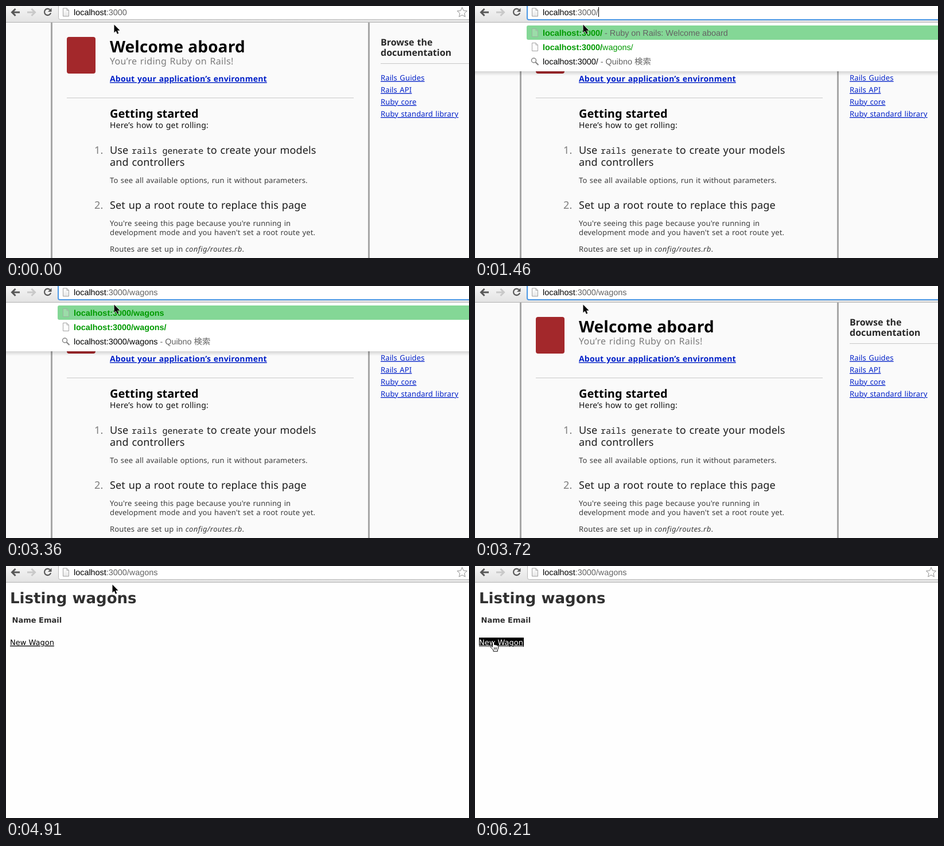
An HTML page that plays this animation: 807 by 440 pixels, repeating every 8000 ms.

```html
<!DOCTYPE html>
<html lang="en">
<head>
<meta charset="utf-8">
<title>Opening the wagons page</title>
<style>
html, body { margin: 0; width: 100%; height: 100%; overflow: hidden; }
svg { display: block; }
text { white-space: pre; text-rendering: geometricPrecision; }
.page { font-family: "Noto Sans", "Open Sans", sans-serif; word-spacing: .056em; }
.body { font-size: 13px; fill: #3c3c3c; letter-spacing: .01em; }
.head { font-size: 18px; fill: #1c1c1c; letter-spacing: .008em; }
.mid { font-size: 14px; fill: #111; letter-spacing: .013em; }
.num { fill: #7c7c7c; }
.bold { font-weight: bold; }
.link { fill: #0020c8; text-decoration: underline; text-decoration-skip-ink: none; }
.code { font: 14.9px "Noto Sans Mono", monospace; word-spacing: 0; letter-spacing: 0; }
.path { font-style: italic; letter-spacing: .03em; }
.list { font: 13px "DejaVu Sans", sans-serif; }
.ui { font: 14.4px "Liberation Sans", "Noto Sans CJK JP", "Noto Sans CJK", sans-serif; }
.black { fill: #000; }
.grey { fill: #636363; }
.green { fill: #009a00; }
.match { fill: #009a00; font-weight: bold; }
</style>
</head>
<body>
<svg width="807" height="440" viewBox="0 0 807 440">
  <defs>
    <linearGradient id="bar" x2="0" y2="1"><stop stop-color="#f5f5f5"/><stop offset="1" stop-color="#e3e3e3"/></linearGradient>
    <linearGradient id="shade" x2="0" y2="1"><stop stop-color="#000" stop-opacity=".15"/><stop offset="1" stop-color="#000" stop-opacity="0"/></linearGradient>
    <linearGradient id="sheet" x2="0" y2="1"><stop stop-color="#fff"/><stop offset="1" stop-color="#e6e6e6"/></linearGradient>
    <g id="doc" stroke="#a4a4a4"><path d="M.5.5h6.5l3.5 3.5v10.5h-10z" stroke-linejoin="round"/><path d="M7 .5v3.5h3.5" fill="none"/></g>
  </defs>

  <g id="welcome" class="page">
    <path fill="#fafafa" d="M0 0h807v440H0z"/>
    <path fill="#a6a6a6" d="M78 28h3v412h-3zM631 28h3v412h-3z"/>
    <path fill="#c8c8c8" d="M106 160h500v1H106zM653 100h154v1H653z"/>
    <rect x="106" y="54" width="50" height="64" rx="4" fill="#a3282b"/>
    <text x="181" y="81" class="bold" font-size="28" letter-spacing=".1">Welcome aboard</text>
    <text x="181" y="102" font-size="16" fill="#7c7c7c" letter-spacing=".33">You’re riding Ruby on Rails!</text>
    <text x="181" y="132" class="mid bold link">About your application’s environment</text>
    <text x="181" y="195" class="bold" font-size="20">Getting started</text>
    <text x="181" y="213" class="mid">Here’s how to get rolling:</text>
    <text x="154" y="258" class="head num">1.</text>
    <text x="181" y="258" class="head">Use</text>
    <text x="219" y="258" class="code" fill="#1c1c1c">rails generate</text>
    <text x="350" y="258" class="head">to create your models</text>
    <text x="181" y="279" class="head">and controllers</text>
    <text x="181" y="309" class="body">To see all available options, run it without parameters.</text>
    <text x="154" y="354" class="head num">2.</text>
    <text x="181" y="354" class="head">Set up a root route to replace this page</text>
    <text x="181" y="384" class="body">You're seeing this page because you're running in</text>
    <text x="181" y="400" class="body">development mode and you haven't set a root route yet.</text>
    <text x="181" y="429" class="body">Routes are set up in <tspan class="path">config/routes.rb</tspan>.</text>
    <g class="bold" font-size="16" fill="#282828">
      <text x="653" y="69">Browse the</text>
      <text x="653" y="87">documentation</text>
    </g>
    <text x="653" y="130" class="body link">Rails Guides</text>
    <text x="653" y="151" class="body link">Rails API</text>
    <text x="653" y="172" class="body link">Ruby core</text>
    <text x="653" y="193" class="body link">Ruby standard library</text>
  </g>

  <g id="listing" class="list">
    <path fill="#fefefe" d="M0 0h807v440H0z"/>
    <g class="bold" fill="#303030">
      <text x="7" y="65" style="font-size:26px">Listing wagons</text>
      <text x="10.5" y="99">Name</text>
      <text x="57" y="99">Email</text>
    </g>
    <rect id="hover" x="7" y="125" width="78" height="16"/>
    <text id="add" x="7" y="138" class="link">New Wagon</text>
  </g>

  <g id="menu" class="ui">
    <path fill="#fff" d="M0 29h807v85H0z"/>
    <path fill="url(#shade)" d="M0 114h807v8H0z"/>
    <path fill="#84d796" d="M93 34h714v25H93a3 3 0 0 1-3-3V37a3 3 0 0 1 3-3z"/>
    <use href="#doc" x="99" y="39" fill="#a5e0b1" opacity=".7"/>
    <use href="#doc" x="99" y="64" fill="#fff"/>
    <g fill="none" stroke="#858585"><circle cx="102.5" cy="95" r="4" stroke-width="1.5"/><path d="M105.5 98l5 5" stroke-width="2.2"/></g>
    <text id="row1" x="118" y="52"></text>
    <text id="row2" x="118" y="77"></text>
    <text id="row3" x="118" y="102"></text>
  </g>

  <g id="toolbar" class="ui">
    <path fill="url(#bar)" d="M0 0h807v28H0z"/>
    <path fill="#b2b2b2" d="M0 28h807v1H0z"/>
    <path d="M16.5 5L10.5 11l6 6M11 11h13" fill="none" stroke="#585858" stroke-width="3"/>
    <path d="M44.5 5l6 6l-6 6M50 11H37" fill="none" stroke="#c9c9c9" stroke-width="3"/>
    <path d="M76.5 6.5A5.6 5.6 0 1 0 78 12" fill="none" stroke="#585858" stroke-width="2.2"/>
    <path d="M79.5 3.5v6.5h-6.5z" fill="#585858"/>
    <path id="field" d="M810 23.5H94.5a3 3 0 0 1-3-3V-3H810" fill="#fff"/>
    <use href="#doc" x="99" y="3.5" fill="url(#sheet)"/>
    <path id="star" d="M795 2.5l2.5 5.6 6 .6-4.5 4.1 1.3 6-5.3-3.1-5.3 3.1 1.3-6-4.5-4.1 6-.6z" fill="#fff" stroke="#909090" stroke-linejoin="round"/>
    <rect id="select" x="118" y="2" width="93" height="17" fill="#b4d5fe"/>
    <text id="url" x="118" y="16"></text>
    <rect id="caret" y="2" width="1" height="17"/>
  </g>

  <path id="pointer" d="M0 0v14l3.2-3 2.2 5.2 2.4-1-2.2-5h4.4z" stroke="#fff" stroke-width="1.2" paint-order="stroke"/>
  <g id="hand" fill="#fff" stroke="#000">
    <path d="M4.5 9.5V2.5Q4.5 1 6 1T7.5 2.5V6.5Q9 5.5 10 7Q11.5 6.2 12.3 7.6Q14.5 7 14.5 9.5V12Q14.5 14 13.3 15.5V18H6V16Q4 13.5 2 11.5Q.8 10 1.8 9.2Q3 8.5 4.5 10.5z"/>
    <path d="M7.5 11v4M9.5 11v4M11.5 11v4" stroke-width=".8"/>
  </g>
</svg>
<script>
const $ = id => document.getElementById(id);
const show = (id, on) => $(id).style.display = on ? '' : 'none';
const place = (id, x, y) => $(id).setAttribute('transform', `translate(${x} ${y})`);
const write = (id, ...runs) => $(id).innerHTML =
  runs.map(([style, text]) => `<tspan class="${style}">${text}</tspan>`).join('');

const LOOP = 8000, STEP = 118.5, PATH = '/wagons';
const keyTimes = [1460, 2050, 2290, 2530, 2650, 2770, 2880];
const typed = t => PATH.slice(0, keyTimes.filter(k => k <= t).length);

function drawUrl(t) {
  const focus = t >= 500 && t < 3840;
  $('field').setAttribute('stroke', focus ? '#4a97e4' : '#b9b9b9');
  $('field').setAttribute('stroke-width', focus ? 2 : 1);
  place('field', focus ? -.5 : 0, focus ? .5 : 0);
  write('url', ['black', 'localhost'], ['grey', ':3000' + typed(t)]);
  show('select', t >= 500 && t < 980);
  show('caret', t >= 980 && t < 3360);
  show('star', t < 1460 || t >= 3840);
  $('caret').setAttribute('x', Math.round(118 + $('url').getComputedTextLength()));
}

function drawMenu(t) {
  const open = t >= 1460 && t < 3720;
  show('menu', open);
  if (!open) return;
  // suggestions catch up one step after the second key
  const path = t < 2170 ? '/' : typed(t);
  const query = 'localhost:3000' + path;
  const done = path === PATH;
  write('row1', ['match', query], ['grey', path === '/' ? ' - Ruby on Rails: Welcome aboard' : '']);
  write('row2', ['match', query + (done ? '/' : '')],
    ['green', done ? '' : PATH.slice(path.length) + '/']);
  write('row3', ['black', query], ['grey', ' - Quibno 検索']);
}

function drawMouse(t) {
  const onLink = t >= 5860;
  show('pointer', !onLink);
  show('hand', onLink);
  show('hover', onLink);
  $('add').style.fill = onLink ? '#fff' : '#000';
  if (onLink) return place('hand', 26, t < 5980 ? 130 : t < 6210 ? 133 : 131);
  if (t < 4910) return place('pointer', 188.5, 32.5);
  if (t >= 5740) return place('pointer', 30, 113);
  const u = Math.min(6, Math.floor((t - 4910) / STEP)) / 6;
  const s = u * u * (3 - 2 * u);
  place('pointer', 185.5 - 154 * s, 32.5 + 65 * s);
}

function frame(now) {
  const t = now % LOOP;
  show('welcome', t < 3960);
  show('listing', t >= 3960);
  drawUrl(t);
  drawMenu(t);
  drawMouse(t);
  requestAnimationFrame(frame);
}
frame(0);
</script>
</body>
</html>
```
